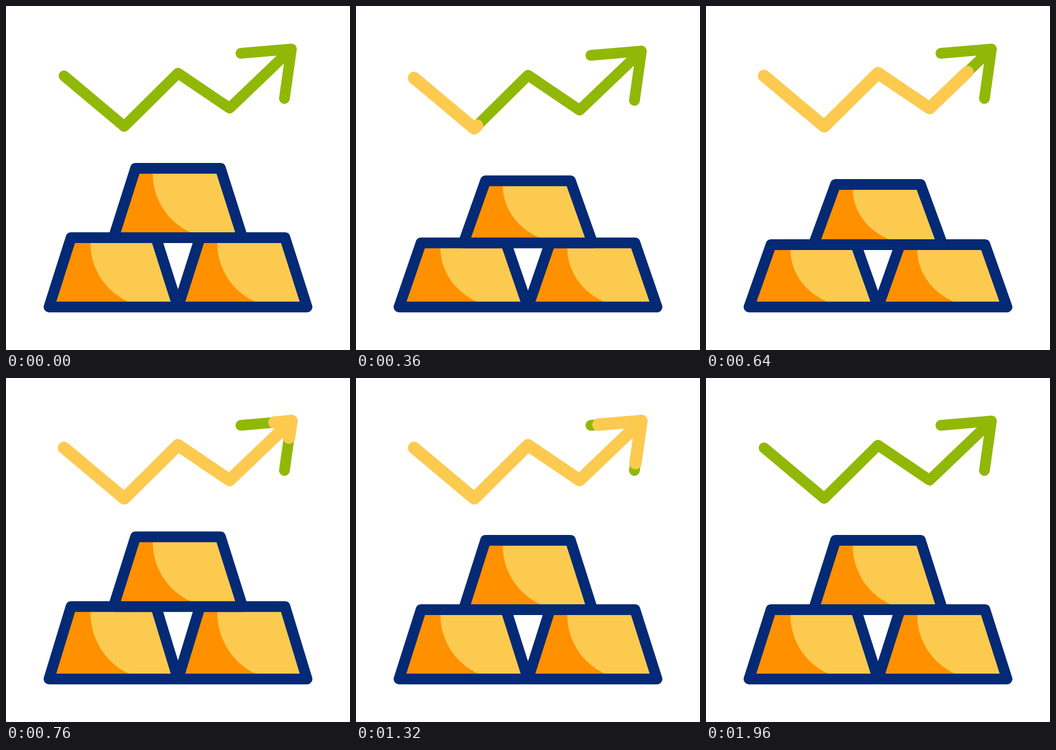
Animation of 640x640 px, one loop 2 s. Source, as an HTML page:

```html
<!DOCTYPE html>
<html lang="en">
<head>
<meta charset="utf-8">
<title>Gold bars with rising arrow</title>
<style>
  html, body { margin: 0; width: 100%; height: 100%; overflow: hidden; background: #fff; }
  svg { display: block; width: 100vw; height: 100vh; }
  path { stroke-linecap: round; stroke-linejoin: round; }
  .green { fill: none; stroke: #91b806; stroke-width: 20; }
  .gold { fill: none; stroke: #fdca50; stroke-width: 23; }
  .body { fill: #fdca50; }
  .shade { fill: #ff9000; }
  .edge { fill: none; stroke: #042a75; stroke-width: 20; }
</style>
</head>
<body>
<svg viewBox="0 0 640 640">
  <g id="bars"></g>
  <g id="arrow"></g>
</svg>
<script>
const LOOP = 2000;
const REST = 129;
const BASE = 560;

const clamp = x => Math.min(1, Math.max(0, x));
const ramp = (t, from, to) => clamp((t - from) / (to - from));
const smooth = u => u * u * (3 - 2 * u);

// Eased value at time t through [time, value] keys.
function track(keys, t) {
  if (t <= keys[0][0]) return keys[0][1];
  for (let i = 1; i < keys.length; i++) {
    const [t0, a] = keys[i - 1], [t1, b] = keys[i];
    if (t <= t1) return a + (b - a) * smooth((t - t0) / (t1 - t0));
  }
  return keys[keys.length - 1][1];
}

function addPath(parent, className, d = '') {
  const path = document.createElementNS('http://www.w3.org/2000/svg', 'path');
  path.setAttribute('class', className);
  path.setAttribute('d', d);
  path.setAttribute('pathLength', 1);
  return parent.appendChild(path);
}

const ARROW_Y = [[80, 0], [240, 30], [440, -10], [600, 0]];
const LOWER_H = [[200, REST], [320, 114], [480, 146], [640, 116], [800, 138], [1080, REST]];
const UPPER_H = [[200, REST], [320, 112], [480, 134], [640, 112], [800, 133], [960, REST]];

const barsGroup = document.getElementById('bars');
const arrowGroup = document.getElementById('arrow');

const LINE = 'M108 130L220 224L320 125L416 190L531 80';
const HEAD = ['M531 80L437 88', 'M531 80L518 172'];
addPath(arrowGroup, 'green', LINE + 'M437 88L531 80L518 172');
const goldLine = addPath(arrowGroup, 'gold', LINE);
const goldHead = HEAD.map(d => addPath(arrowGroup, 'gold', d));

function makeBar(x, shadeX) {
  const [body, shade, edge] = ['body', 'shade', 'edge'].map(name => addPath(barsGroup, name));
  return (bottom, height) => {
    const top = bottom - height, k = height / REST;
    const outline = `M${x} ${bottom}L${x + 41} ${top}H${x + 199}L${x + 240} ${bottom}Z`;
    body.setAttribute('d', outline);
    edge.setAttribute('d', outline);
    shade.setAttribute('d', `M${x} ${bottom}L${x + 41} ${top}H${x + shadeX}V${top + 10 * k}` +
      `A120 ${120 * k} 0 0 0 ${x + shadeX + 104.5} ${bottom}Z`);
  };
}

const lowerBars = [makeBar(80, 77), makeBar(320, 73)];
const upperBar = makeBar(200, 73);

function reveal(path, amount) {
  path.style.display = amount > 0 ? '' : 'none';
  path.style.strokeDasharray = amount < 1 ? `${amount} 2` : 'none';
}

function draw(t) {
  arrowGroup.setAttribute('transform', `translate(0 ${track(ARROW_Y, t)})`);

  // The gold line grows, holds, then retreats along the same way.
  const growth = Math.min(t, 2190 - t);
  reveal(goldLine, ramp(growth, 237, 691));
  goldHead.forEach(path => reveal(path, ramp(growth, 691, 900)));

  const lower = track(LOWER_H, t);
  const hop = ramp(t, 380, 600);
  const lift = 112 * hop * (1 - hop);
  lowerBars.forEach(bar => bar(BASE, lower));
  upperBar(BASE - lower - lift, track(UPPER_H, t));
}

const start = performance.now();
function tick() {
  draw((performance.now() - start) % LOOP);
  requestAnimationFrame(tick);
}
tick();
</script>
</body>
</html>
```
